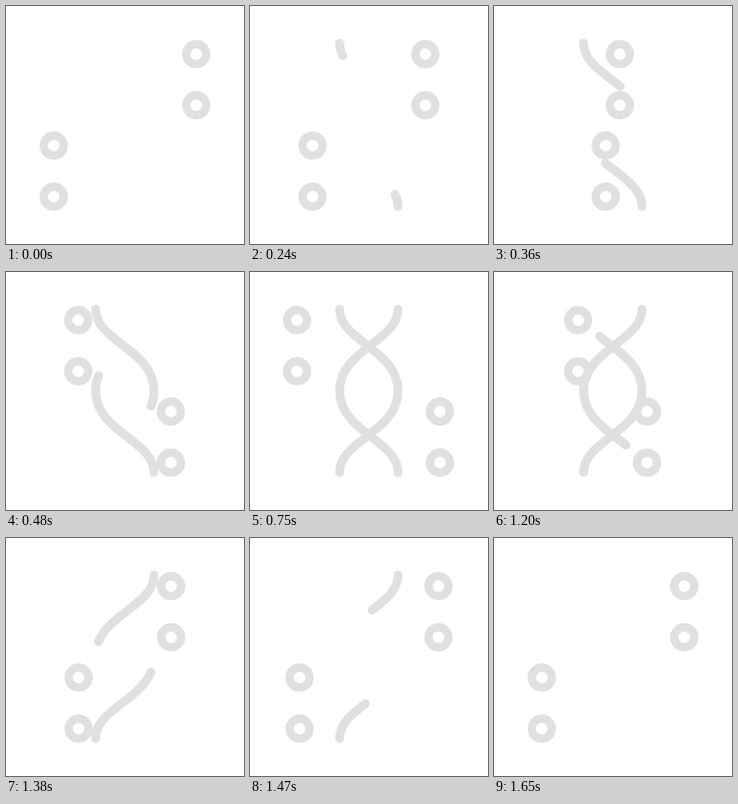
These frames come from a looping animation (298x298 px, 1.8 s). An HTML page:

```html
<!DOCTYPE html>
<html lang="en">
<head>
<meta charset="utf-8">
<title>Helix loader</title>
<style>
  html, body { margin: 0; width: 100%; height: 100%; overflow: hidden; background: #fff; }
  svg { display: block; width: 100%; height: 100%; }
  svg * { fill: none; stroke: #e0e0e0; }
  circle { stroke-width: 10.4; }
  path { stroke-width: 11; stroke-linecap: round; }
</style>
</head>
<body>
<svg viewBox="0 0 298 298">
  <path class="strand" pathLength="100"
        d="M112.2 46.5 C112.2 87 185.3 97 185.3 148.75 C185.3 200.5 112.2 210.5 112.2 251"/>
  <path class="strand" pathLength="100" transform="rotate(180 148.75 148.75)"
        d="M112.2 46.5 C112.2 87 185.3 97 185.3 148.75 C185.3 200.5 112.2 210.5 112.2 251"/>
  <circle class="ring" cy="60.3" r="12.5"/>
  <circle class="ring" cy="124.3" r="12.5"/>
  <circle class="ring" cy="174.7" r="12.5"/>
  <circle class="ring" cy="238.7" r="12.5"/>
</svg>
<script>
  const LOOP = 1800, HALF = LOOP / 2, TICK = 30;
  const BEGIN = 150, RING_END = 600, STRAND_END = 750;
  const TOP = [238.2, 58.9], BOTTOM = [59.8, 237.7];

  const strands = document.querySelectorAll('.strand');
  const rings = document.querySelectorAll('.ring');

  const ease = (t, end) => {
    const p = Math.min(1, Math.max(0, (t - BEGIN) / (end - BEGIN)));
    return p * p * (3 - 2 * p);
  };
  const mix = ([a, b], p) => a + (b - a) * p;

  function draw(ms) {
    const t = Math.floor((ms % LOOP) / TICK + 1e-6) * TICK;
    const back = t >= HALF;
    const phase = t % HALF;

    const move = ease(phase, RING_END);
    const side = back ? 1 - move : move;
    rings.forEach((ring, i) => ring.setAttribute('cx', mix(i < 2 ? TOP : BOTTOM, side)));

    // Strands grow from their start on the way out and shrink from it on the way back.
    const trim = 100 * ease(phase, STRAND_END);
    const from = back ? trim : 0;
    const to = back ? 100 : trim;
    for (const strand of strands) {
      strand.style.visibility = to > from ? 'visible' : 'hidden';
      strand.setAttribute('stroke-dasharray', `${to - from} 300`);
      strand.setAttribute('stroke-dashoffset', -from);
    }
  }

  const start = performance.now();
  function loop() {
    draw(performance.now() - start);
    requestAnimationFrame(loop);
  }
  loop();
</script>
</body>
</html>
```
